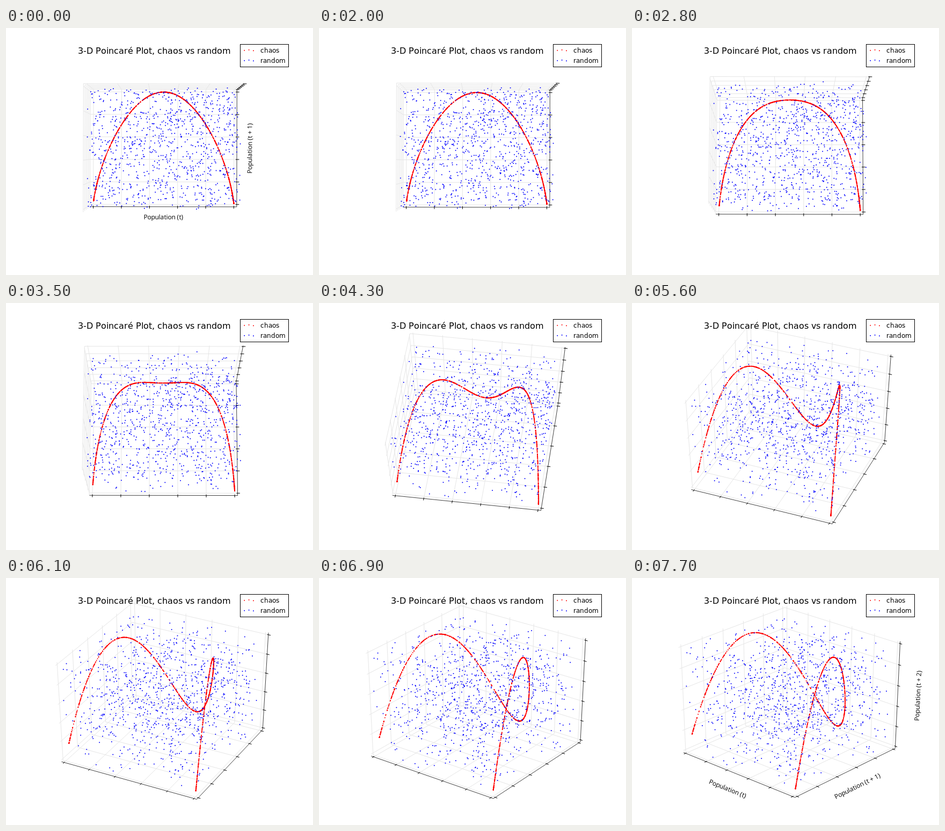
An HTML page with a canvas for the animation above (10000 ms loop, 572 by 460 pixels).

```html
<!DOCTYPE html>
<html lang="en">
<head>
<meta charset="utf-8">
<title>3-D Poincaré Plot</title>
<style>
  html, body { margin: 0; width: 100%; height: 100%; overflow: hidden; background: #fff; }
  canvas { display: block; }
</style>
</head>
<body>
<canvas id="stage" width="572" height="460"></canvas>
<script>
const ctx = document.getElementById('stage').getContext('2d');
const STEP_MS = 100, STEPS = 100;
const RED = '#f00', BLUE = '#00f', GRID = '#e6e6e6';

// Projection: unit cube seen from a camera 11 units away
const DISTANCE = 11, CENTER_X = 293.74, CENTER_Y = 223.57;
const SCALE_X = 558 / 0.185, SCALE_Y = 446.4 / 0.185;

// Box edges lie slightly outside the 0..1 data range
const DELTA = 1 / 12, LOW = -DELTA / 4, HIGH = 1 + DELTA / 4;
const BACK = [LOW, HIGH, LOW];
const TICKS = [0, 0.2, 0.4, 0.6, 0.8, 1];
const LABEL_GAP = 0.1;
const AXES = [
  { index: 0, flip: 1, tickDir: 1, label: 'Population (t)' },
  { index: 1, flip: 0, tickDir: 0, label: 'Population (t + 1)' },
  { index: 2, flip: 0, tickDir: 0, label: 'Population (t + 2)' }
];

// Camera moves: [first step, last step, elevation change, azimuth change] per step
const MOVES = [
  [20, 22, -0.5, 0],
  [23, 36, -1, 0],
  [37, 60, -1.5, 1.1],
  [61, 64, -1, 1.1],
  [65, 73, -0.5, 1.1],
  [74, 76, -0.2, 0.5]
];
const LABELS_OFF = 20, LABELS_ON = 77;

function seededRandom(seed) {
  return () => {
    seed = (seed + 0x6D2B79F5) | 0;
    let h = Math.imul(seed ^ (seed >>> 15), 1 | seed);
    h = (h + Math.imul(h ^ (h >>> 7), 61 | h)) ^ h;
    return ((h ^ (h >>> 14)) >>> 0) / 4294967296;
  };
}

function series(first, next) {
  const values = [first];
  while (values.length < 1000) values.push(next(values[values.length - 1]));
  return values;
}

// Each value paired with its two successors
const embed = values => values.slice(2).map((v, i) => [values[i], values[i + 1], v]);

const random = seededRandom(7);
const chaosPoints = embed(series(0.5, x => x * 3.99 * (1 - x)));
const randomPoints = embed(series(random(), random));

function cameraAt(step) {
  let elevation = 89.9, azimuth = 270.1;
  for (const [first, last, dElevation, dAzimuth] of MOVES) {
    const count = Math.max(0, Math.min(step, last) - first + 1);
    elevation += count * dElevation;
    azimuth += count * dAzimuth;
  }
  return { elevation: elevation * Math.PI / 180, azimuth: azimuth * Math.PI / 180 };
}

function projector({ elevation, azimuth }) {
  const ce = Math.cos(elevation), se = Math.sin(elevation);
  const ca = Math.cos(azimuth), sa = Math.sin(azimuth);
  return point => {
    const [x, y, z] = point.map(v => v - 0.5);
    const along = x * ca + y * sa;
    const depth = DISTANCE - along * ce - z * se;
    return [
      CENTER_X + (y * ca - x * sa) * SCALE_X / depth,
      CENTER_Y - (z * ce - along * se) * SCALE_Y / depth
    ];
  };
}

const withValue = (point, index, value) => point.map((v, i) => i === index ? value : v);
const opposite = (point, index) => withValue(point, index, LOW + HIGH - point[index]);

function polyline(points, color, width) {
  ctx.beginPath();
  points.forEach(p => ctx.lineTo(...p));
  ctx.strokeStyle = color;
  ctx.lineWidth = width;
  ctx.stroke();
}

function dots(points, color) {
  ctx.fillStyle = color;
  for (const [x, y] of points) {
    ctx.beginPath();
    ctx.arc(x, y, 1, 0, 2 * Math.PI);
    ctx.fill();
  }
}

// Glyphs advance by whole pixels, as in hinted text
const advance = glyph => Math.round(ctx.measureText(glyph).width);

function text(string, x, y, font, centered = false) {
  ctx.font = font;
  ctx.fillStyle = '#000';
  const glyphs = [...string];
  if (centered) x -= glyphs.reduce((sum, g) => sum + advance(g), 0) / 2;
  for (const glyph of glyphs) {
    ctx.fillText(glyph, x, y);
    x += advance(glyph);
  }
}

function drawGrid(project) {
  for (const { index } of AXES) {
    for (const value of TICKS) {
      const corner = withValue(BACK, index, value);
      const ends = [opposite(corner, (index + 1) % 3), corner, opposite(corner, (index + 2) % 3)];
      polyline(ends.map(project), GRID, 1);
    }
  }
}

function drawAxis(project, { index, flip, tickDir }) {
  const start = opposite(BACK, flip);
  polyline([start, opposite(start, index)].map(project), '#000', 0.75);
  const outward = start[tickDir] > 0.5 ? DELTA : -DELTA;
  for (const value of TICKS) {
    const at = withValue(start, index, value);
    const ends = [0.2, -0.1].map(f => withValue(at, tickDir, start[tickDir] + f * outward));
    polyline(ends.map(project), '#000', 1);
  }
}

function drawAxisLabel(project, { index, flip, label }) {
  const start = opposite(BACK, flip);
  const [a, b] = [start, opposite(start, index)].map(project);
  let angle = Math.atan2(b[1] - a[1], b[0] - a[0]);
  // Keep text reading left to right, or upwards
  if (angle > Math.PI / 2 - 0.05) angle -= Math.PI;
  if (angle < -Math.PI / 2 - 0.05) angle += Math.PI;
  const anchor = start.map((v, i) => i === index ? 0.5 : v + Math.sign(v - 0.5) * LABEL_GAP);
  ctx.save();
  ctx.translate(...project(anchor));
  ctx.rotate(angle);
  text(label, 0, 3.5, '12px "Open Sans", sans-serif', true);
  ctx.restore();
}

function drawLegend() {
  ctx.fillStyle = '#fff';
  ctx.fillRect(436.5, 30.5, 90, 42);
  ctx.strokeStyle = '#000';
  ctx.lineWidth = 1;
  ctx.strokeRect(436.5, 30.5, 90, 42);
  [['chaos', RED, 46], ['random', BLUE, 65]].forEach(([name, color, y]) => {
    dots([[444.2, y - 4.2], [452.6, y - 5.2], [461, y - 3.7]], color);
    text(name, 474, y, '12px "DejaVu Sans", sans-serif');
  });
}

function draw(step) {
  const project = projector(cameraAt(step));
  ctx.fillStyle = '#fff';
  ctx.fillRect(0, 0, 572, 460);
  drawGrid(project);
  AXES.forEach(axis => drawAxis(project, axis));
  dots(chaosPoints.map(project), RED);
  dots(randomPoints.map(project), BLUE);
  if (step < LABELS_OFF) AXES.slice(0, 2).forEach(axis => drawAxisLabel(project, axis));
  if (step >= LABELS_ON) AXES.forEach(axis => drawAxisLabel(project, axis));
  text('3-D Poincaré Plot, chaos vs random', 134, 48, '16px "DejaVu Sans", sans-serif');
  drawLegend();
}

const startTime = performance.now();
function tick() {
  const elapsed = Math.max(0, performance.now() - startTime);
  draw(Math.floor(elapsed / STEP_MS) % STEPS);
  requestAnimationFrame(tick);
}
tick();
</script>
</body>
</html>
```
